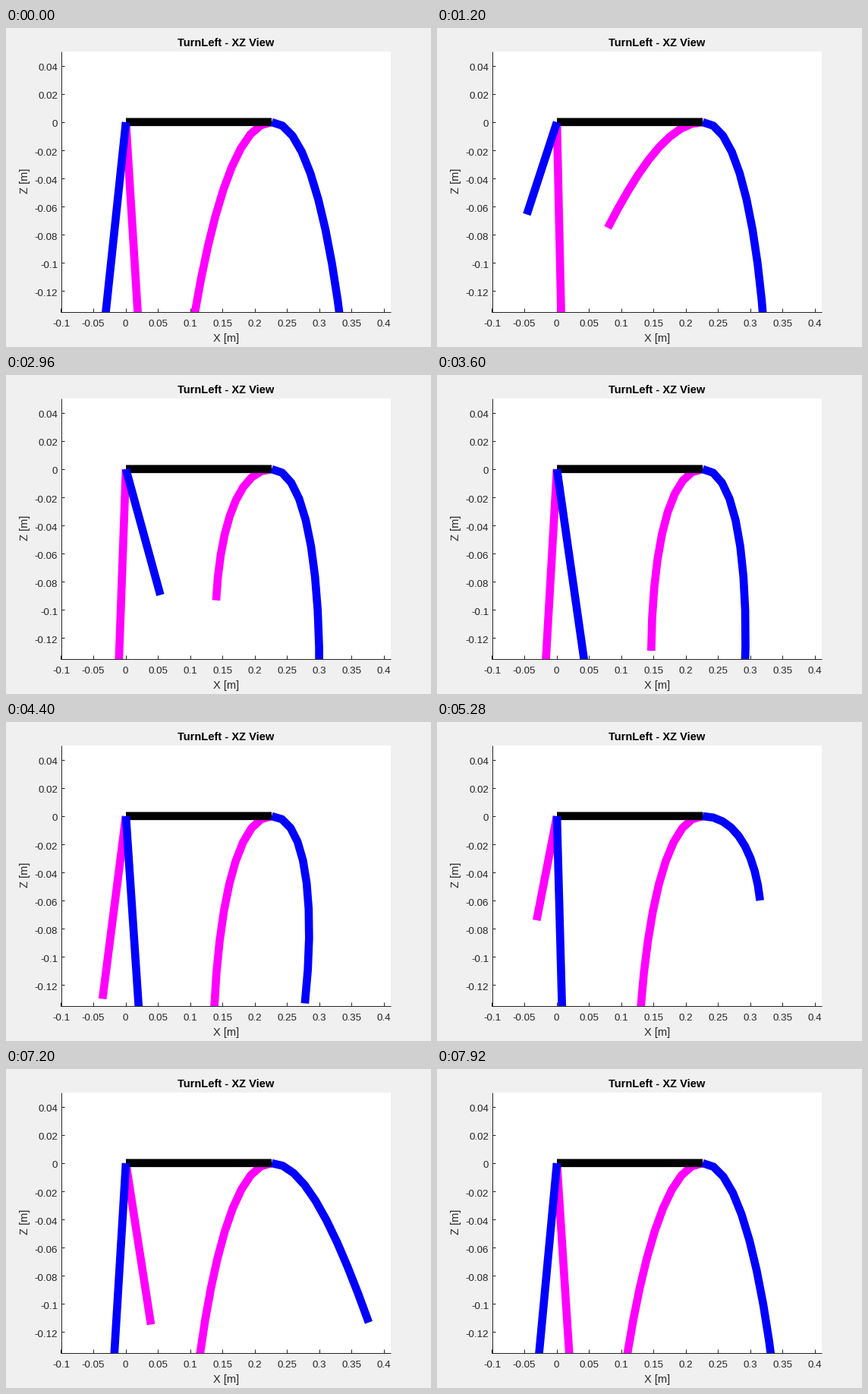
A matplotlib script that plays this animation: 560 px wide and 420 px high, repeating every 8 s.

```python
import numpy as np
import matplotlib.pyplot as plt
from matplotlib.animation import FuncAnimation
from matplotlib.patches import Rectangle

W, H, DPI = 560, 420, 100
FRAMES, INTERVAL = 100, 80
HALF = FRAMES // 2
LEFT, RIGHT, TOP, BOTTOM = 73, 507, 31, 374
X_SCALE, Z_SCALE = 851, 1854          # pixels per metre
X_ZERO, Z_ZERO = 157.6, 124
REAR, FRONT = (158, 124), (350, 124)  # hip positions
LEG_WIDTH = 10.67
OVERSHOOT = 1.35                      # extra reach at both ends of a swing
BULGE = 0.35                          # how far a curved leg sags below a parabola
INK = "#262626"
MAGENTA, BLUE = "#ff00ff", "#0000ff"


def pt(px):
    return px * 72 / DPI


class Leg:
    """Swings from back to front for half a cycle, then slides back on the ground."""

    def __init__(self, hip, color, start, back, front, drop, lift,
                 bend=0, shift=0, bow=0):
        self.hip, self.start = hip, start
        self.back, self.front = back, front    # foot x at lift-off and touch-down
        self.drop, self.lift = drop, lift      # foot depth, height of the swing
        self.bend, self.shift, self.bow = bend, shift, bow
        self.line, = ax.plot([], [], color=color, lw=pt(LEG_WIDTH),
                             zorder=4 if color == BLUE else 2,
                             solid_capstyle="butt", solid_joinstyle="round")
        self.line.set_clip_path(window)

    def foot(self, frame):
        phase = (frame - self.start) % FRAMES / HALF
        if phase < 1:
            u = 2 * phase - 1
            raised = (1 - u * u) ** 2
            reach = u + OVERSHOOT * np.sin(np.pi * u)
            x = (self.back + self.front + (self.front - self.back) * reach) / 2
            return x + self.shift * raised, self.drop - self.lift * raised
        s = phase - 1
        x = self.front + (self.back - self.front) * s + self.bow * s * (1 - s)
        return x, self.drop

    def pose(self, frame):
        x, drop = self.foot(frame)
        if self.bend:
            t = np.linspace(0, 1, 10)
            xs = 2 * self.bend * t * (1 - t) + x * t * t
            ys = drop * t * t * (1 + BULGE * (1 - t))
        else:
            xs, ys = np.array([0, x]), np.array([0, drop])
        self.line.set_data(self.hip[0] + xs, self.hip[1] + ys)


def label(x, y, text, size, **kw):
    style = dict(ha="center", va="baseline", color=INK, family="Liberation Sans")
    ax.text(x, y, text, fontsize=pt(size), **{**style, **kw})


def rule(xs, ys):
    ax.plot(xs, ys, color=INK, lw=pt(1), zorder=1.5, solid_capstyle="butt")


def draw_axes():
    rule([LEFT - 1, RIGHT], [BOTTOM - 0.5] * 2)
    rule([LEFT - 0.5] * 2, [TOP, BOTTOM])
    for i in range(-2, 9):
        x = X_ZERO + i * 0.05 * X_SCALE
        rule([x, x], [BOTTOM - 5, BOTTOM])
        label(x, 393, f"{i * 0.05:.2g}", 13.33)
    for i in range(-6, 3):
        y = Z_ZERO - i * 0.02 * Z_SCALE
        rule([LEFT, LEFT + 4], [y, y])
        label(68, y + 6.5, f"{i * 0.02:.2g}", 13.33, ha="right")
    label(290, 24, "TurnLeft - XZ View", 14.67, weight="bold", color="black")
    label(290, 413, "X [m]", 14.67)
    label(24.5, 201, "Z [m]", 14.67, rotation=90, va="center")


fig = plt.figure(figsize=(W / DPI, H / DPI), dpi=DPI, facecolor="#f0f0f0")
ax = fig.add_axes([0, 0, 1, 1])
ax.axis("off")
window = ax.add_patch(Rectangle((LEFT, TOP), RIGHT - LEFT, BOTTOM - TOP,
                                fc="white", ec="none", zorder=0))
draw_axes()
ax.plot([REAR[0], FRONT[0]], [123.8] * 2, color="black", lw=pt(LEG_WIDTH),
        solid_capstyle="butt", zorder=3, snap=False)

# Diagonal pairs step together, half a cycle apart.
legs = [
    Leg(REAR, MAGENTA, HALF - 1, back=-18.5, front=17.5, drop=270, lift=165),
    Leg(FRONT, MAGENTA, -1, back=-99.3, front=-72.3, drop=252, lift=149,
        bend=-66, shift=-23.5),
    Leg(REAR, BLUE, -1, back=-25.3, front=24, drop=270, lift=196),
    Leg(FRONT, BLUE, HALF - 1, back=51, front=94.3, drop=285, lift=216,
        bend=66, shift=43, bow=7),
]

ax.set_xlim(0, W)
ax.set_ylim(H, 0)


def update(frame):
    for leg in legs:
        leg.pose(frame)
    return [leg.line for leg in legs]


anim = FuncAnimation(fig, update, frames=FRAMES, interval=INTERVAL,
                     repeat=True, repeat_delay=0)
plt.show()
```
